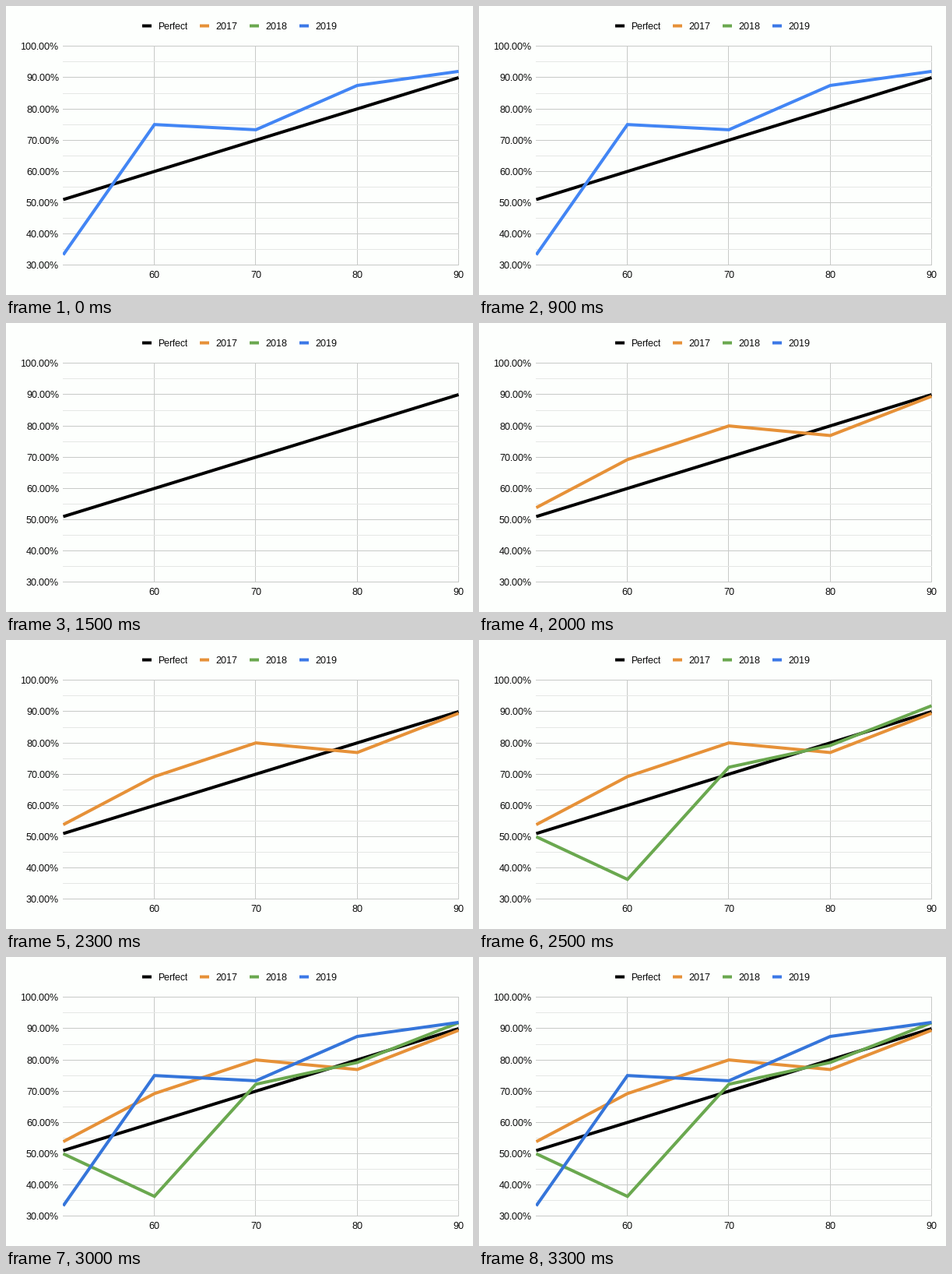
A matplotlib script for the animation above (3500 ms loop, 600 by 371 pixels).

```python
import matplotlib.pyplot as plt
from matplotlib.animation import FuncAnimation
from matplotlib.patches import Rectangle

W, H, DPI = 600, 371, 100
PX = 72 / DPI
LEFT, RIGHT, TOP, BOTTOM = 73, 581, 51.32, 332.32
BG, MAJOR, MINOR = "#fdfffd", "#c8cac8", "#e5e7e5"
BRIGHT_BLUE, BLUE = "#4285f4", "#3575da"

XS = [51, 60, 70, 80, 90]
SERIES = {
    "Perfect": ("#000000", XS),
    "2017": ("#e69138", [53.85, 69.23, 80, 76.92, 89.47]),
    "2018": ("#6aa84f", [50, 36.36, 72.22, 79.17, 91.89]),
    "2019": (BLUE, [33.33, 75, 73.33, 87.5, 92]),
}
LEGEND_X = [175, 249, 313, 377]

# Visible series for each half-second step
INTRO = {"Perfect", "2019"}
STEPS = [INTRO] * 3 + [set(list(SERIES)[:n]) for n in (1, 2, 3, 4)]


def px(v):
    return LEFT + (v - 51) * (RIGHT - LEFT) / 39


def py(v):
    return TOP + (100 - v) * (BOTTOM - TOP) / 70


# Whole-pixel glyph advances, as in browser text
plt.rcParams.update({"font.family": "Liberation Sans",
                     "text.hinting": "native", "text.hinting_factor": 1})
fig = plt.figure(figsize=(W / DPI, H / DPI), dpi=DPI, facecolor=BG)
ax = fig.add_axes([0, 0, 1, 1])
ax.set(xlim=(0, W), ylim=(H, 0))
ax.axis("off")


def box(x, y, w, h, color, z=1):
    ax.add_patch(Rectangle((x, y), w, h, fc=color, lw=0, zorder=z, snap=False))


def label(x, y, text, ha="left"):
    ax.text(x, y, text, ha=ha, va="baseline", size=12 * PX, color="black")


def hline(v, color, z):
    box(LEFT, round(py(v)), RIGHT + 1 - LEFT, 1, color, z)


for v in range(30, 101, 10):
    hline(v, MAJOR, 3)
    if v < 100:
        hline(v + 5, MINOR, 2)
    label(68, round(py(v)) + 5, f"{v}.00%", "right")

for v in XS[1:]:
    box(round(px(v)), 51, 1, 282, MAJOR, 1)
    label(px(v) + 0.5, 349, str(v), "center")

clip = Rectangle((LEFT, 40), RIGHT + 1 - LEFT, 300, transform=ax.transData)
lines = {}
for i, (name, (color, ys)) in enumerate(SERIES.items()):
    box(LEGEND_X[i], 23.5, 12, 4, "#3b78e7" if name == "2019" else color)
    label(LEGEND_X[i] + 20, 30, name)
    (line,) = ax.plot([px(v) + 0.5 for v in XS], [py(v) + 0.5 for v in ys],
                      color=color, lw=4 * PX, zorder=5 + i, snap=False,
                      solid_joinstyle="miter", solid_capstyle="butt")
    line.set_clip_path(clip)
    lines[name] = line


def draw(k):
    shown = STEPS[k]
    for name, line in lines.items():
        line.set_visible(name in shown)
    lines["2019"].set_color(BRIGHT_BLUE if shown is INTRO else BLUE)
    return list(lines.values())


anim = FuncAnimation(fig, draw, frames=len(STEPS), interval=500,
                     repeat=True, repeat_delay=0, blit=False)
plt.show()
```
